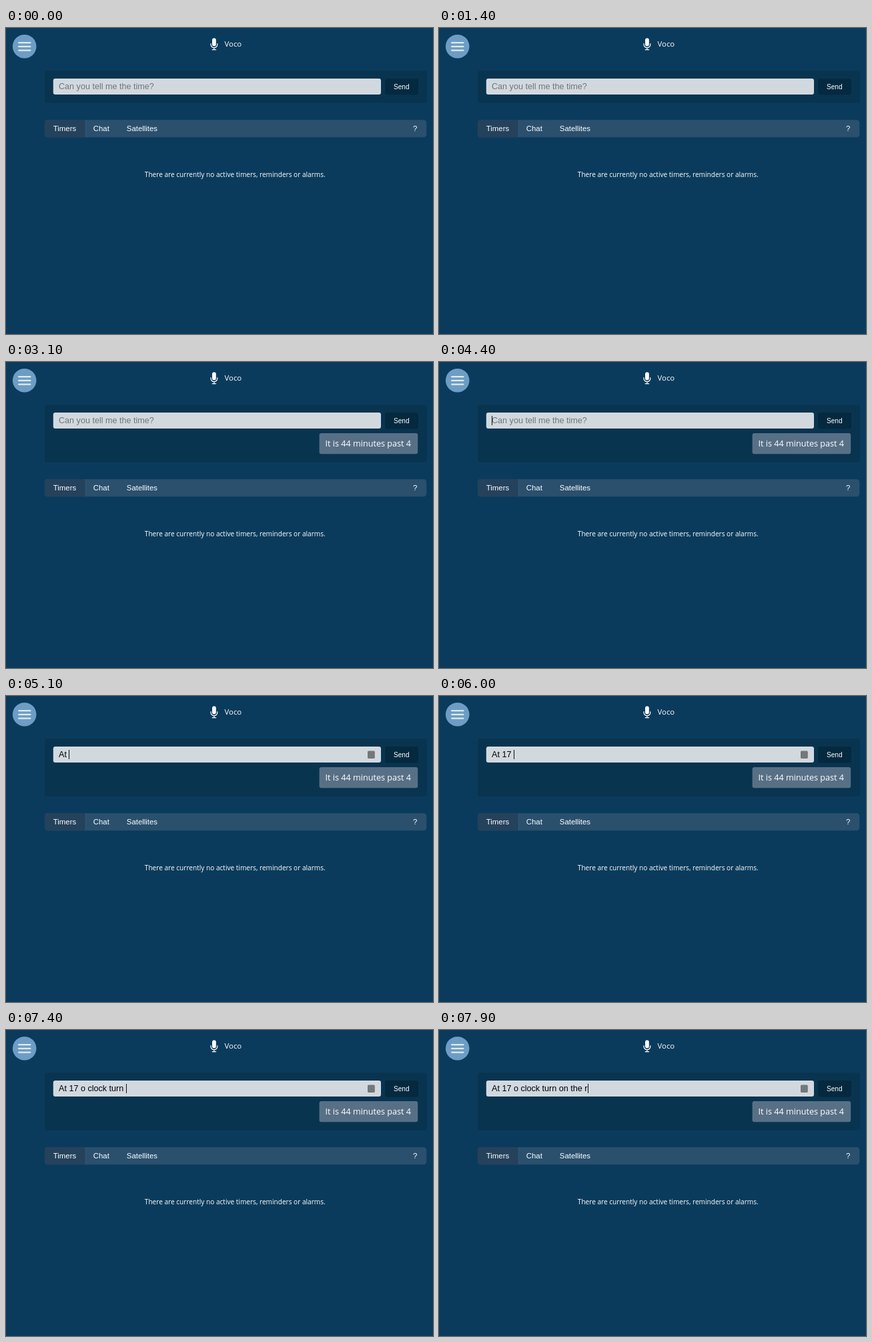
An HTML page that plays this animation: 640 by 460 pixels, repeating every 8 s.

```html
<!DOCTYPE html>
<html lang="en">
<head>
<meta charset="utf-8">
<title>Voice assistant</title>
<style>
  html, body { margin: 0; width: 100%; height: 100%; overflow: hidden; background: #0b3b5c; }
  svg { display: block; width: 640px; height: 460px; }
  text { fill: #fff; white-space: pre; }
  .ui { font-family: "Liberation Sans", Arial, sans-serif; }
  .copy { font-family: "Open Sans", "Noto Sans", sans-serif; }
  .tab { font-size: 11.4px; }
  .field { font-size: 12.6px; }
</style>
</head>
<body>
<svg viewBox="0 0 640 460">
  <rect width="640" height="460" fill="#0b3b5c"/>

  <circle cx="27.7" cy="27.7" r="17.8" fill="#6d9dc4"/>
  <path d="M19.2 22.2h17.2M19.2 27.9h17.2M19.2 33.6h17.2" stroke="#dfeaf4" stroke-width="2.3" stroke-linecap="round"/>

  <g fill="none" stroke="#fff" stroke-width="1.2" stroke-linecap="round">
    <rect x="309" y="15.3" width="5.8" height="12" rx="2.9" fill="#fff" stroke="none"/>
    <path d="M307 23.6v1.2a4.9 4.9 0 0 0 9.8 0v-1.2M311.9 29.8v2.6M309.2 32.6h5.4"/>
  </g>
  <text class="copy" x="327.5" y="28.4" font-size="11.4">Voco</text>

  <rect id="panel" x="58" y="64" width="573" height="49" rx="4" fill="#093450"/>
  <rect x="70.8" y="76" width="491.2" height="24" rx="3" fill="#d1d9df"/>
  <text id="hint" class="ui field" x="79" y="92.4" style="fill:#70767a">Can you tell me the time?</text>
  <text id="typed" class="ui field" x="79" y="92.4" style="fill:#000"></text>
  <rect id="caret" y="81" width="1" height="14" fill="#111"/>
  <rect id="badge" x="542" y="82.5" width="10.8" height="11.5" rx="1.5" fill="#74787b"/>

  <rect id="send" x="568" y="76" width="50" height="24.6" rx="3" fill="#042a41"/>
  <text class="ui" x="592.8" y="91.8" font-size="10.1" text-anchor="middle">Send</text>

  <g id="reply">
    <rect x="469.6" y="107" width="147.6" height="31.2" rx="3" fill="#587086"/>
    <text class="copy" x="478.6" y="127.3" font-size="12.64">It is 44 minutes past 4</text>
  </g>

  <g id="lower">
    <rect x="58" y="138.3" width="572.3" height="26" rx="4.5" fill="#2a506e"/>
    <path d="M119 138.3H62.5a4.5 4.5 0 0 0 -4.5 4.5v17a4.5 4.5 0 0 0 4.5 4.5H119z" fill="#25425c"/>
    <path d="M119.3 138.3v26" stroke="#3a5d79" stroke-width=".7"/>
    <g class="ui tab">
      <text x="70.8" y="155.2">Timers</text>
      <text x="130.8" y="155.2">Chat</text>
      <text x="180.8" y="155.2">Satellites</text>
      <text x="610" y="155.2">?</text>
    </g>
    <text class="copy" x="207.8" y="224.4" font-size="10.1">There are currently no active timers, reminders or alarms.</text>
  </g>
</svg>
<script>
const LOOP = 8000, HOVER_END = 1900, REPLY_AT = 3100, FOCUS_AT = 4200;
const SENTENCE = "At 17 o clock turn on the r";

// [time, number of characters typed so far]
const KEYS = [
  [4600, 1], [4800, 2], [5000, 3], [5400, 4], [5600, 5], [6000, 6],
  [6100, 7], [6200, 8], [6300, 9], [6400, 10], [6500, 11], [6600, 12],
  [6700, 13], [6800, 14], [7000, 15], [7100, 16], [7200, 17], [7300, 18],
  [7400, 19], [7500, 20], [7600, 22], [7700, 23], [7800, 25], [7900, 27]
];

const $ = id => document.getElementById(id);
const show = (id, on) => $(id).setAttribute("visibility", on ? "visible" : "hidden");
const pen = document.createElement("canvas").getContext("2d");
pen.font = '12.6px "Liberation Sans", Arial, sans-serif';

function draw(t) {
  const replied = t >= REPLY_AT;
  show("reply", replied);
  $("panel").setAttribute("height", replied ? 87 : 49);
  $("lower").setAttribute("transform", `translate(0 ${replied ? 38 : 0})`);
  $("send").setAttribute("fill", t < HOVER_END ? "#042a41" : "#05293f");

  const count = KEYS.reduce((n, [at, len]) => t >= at ? len : n, 0);
  const text = SENTENCE.slice(0, count);
  $("typed").textContent = text;
  show("hint", !count);
  show("badge", count);
  show("caret", t >= FOCUS_AT);
  $("caret").setAttribute("x", Math.round(79 + pen.measureText(text).width));
}

const start = performance.now();
function tick() {
  draw((performance.now() - start) % LOOP);
  requestAnimationFrame(tick);
}
tick();
</script>
</body>
</html>
```
